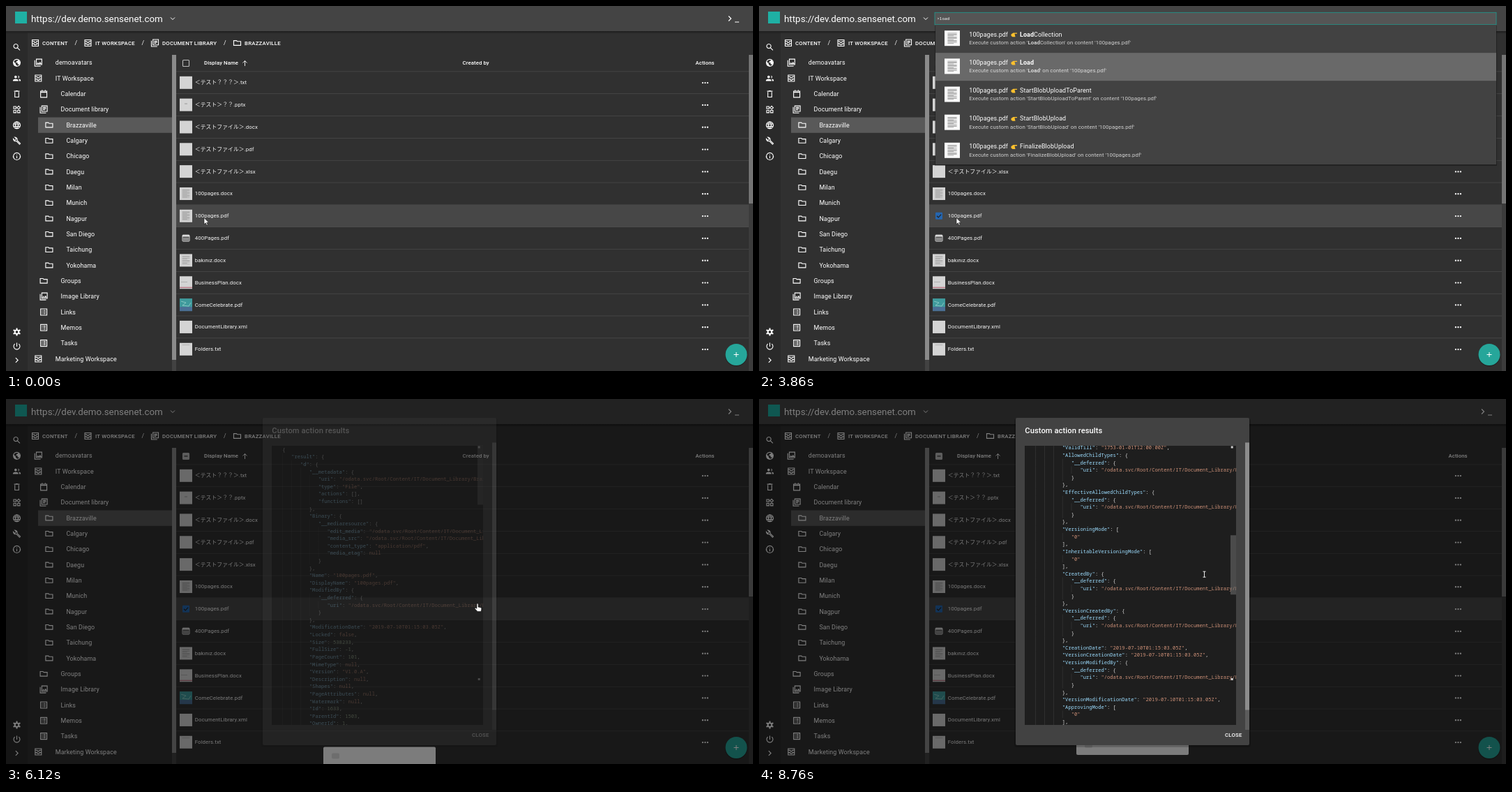
Animation of 1071 by 523 pixels, one loop 9.91 s. Source, as an HTML page:

```html
<!DOCTYPE html>
<html lang="en">
<head>
<meta charset="utf-8">
<title>Custom actions demo</title>
<style>
html, body { margin: 0; width: 100%; height: 100%; overflow: hidden; background: #303030; }
svg { display: block; width: 100%; height: 100%; }
text { font-family: Roboto, "Noto Sans CJK JP", "Noto Sans", sans-serif; fill: #fff; white-space: pre; }
.mono { font-family: "Noto Sans Mono", "DejaVu Sans Mono", monospace; }
.s { fill: none; stroke: #fff; }
</style>
</head>
<body>
<svg id="stage" viewBox="0 0 1071 523"></svg>
<script>
const LOOP = 9910, LINE = 10.61;
const out = [];
const add = s => out.push(s);
const esc = s => s.replace(/&/g, '&amp;').replace(/</g, '&lt;');

const rect = (x, y, w, h, fill, more = '') =>
  add(`<rect x="${x}" y="${y}" width="${w}" height="${h}" fill="${fill}" ${more}/>`);
const path = (d, more) => add(`<path d="${d}" ${more}/>`);
// y is the middle of the capitals
const raw = (x, y, html, size, more = '') =>
  add(`<text x="${x}" y="${(y + size * .355).toFixed(2)}" font-size="${size}" letter-spacing=".01em" ${more}>${html}</text>`);
const text = (x, y, str, size, more) => raw(x, y, esc(str), size, more);
const caps = (x, y, str, more = '') =>
  add(`<text x="${x}" y="${y + 2.8}" font-size="7.81" font-weight="500" letter-spacing=".0286em" ${more}>${str}</text>`);
const open = (id, more = '') => add(`<g id="${id}" ${more}>`);
const close = () => add('</g>');

// [stroked outline, filled part, line width] on a 24 unit grid
const RING = 'M12 3a9 9 0 1 0 .01 0';
const ICONS = {
  search: ['M9.5 4a5.5 5.5 0 1 0 .01 0M14 14l6 6'],
  earth: [RING, 'M4 9l5 5v2l3 3v2q-9 0-8-12M15 4v2q-1 2-4 2v3H8v1h6v4h3l2 2q4-9-4-14'],
  people: ['', 'M9 11.5a3.3 3.3 0 1 0-.01 0M2 19v-2c0-4 14-4 14 0v2zM15 11.5a3.3 3.3 0 1 0 0-6.6 5 5 0 0 1 0 6.6M17 13.5c3 .5 5 2 5 3.500v2h-4v-2q0-2-1-3.500'],
  trash: ['M7 7v13h10V7M5 5h14M9.500 4h5'],
  widgets: ['M4 4h6v6H4zM4 14h6v6H4zM14 14h6v6h-6zM16.700 3l4.200 4.200-4.200 4.200-4.200-4.200z'],
  globe: [RING + 'M12 3c-5 5-5 13 0 18c5-5 5-13 0-18M3.500 9h17M3.500 15h17'],
  wrench: ['M13 11l8 8-2 2-8-8c-4 1-8-1-8-6l4 4 4-4-4-4c5 0 7 4 6 8z'],
  info: [RING + 'M12 11v6M12 7v2'],
  gear: ['M12 7a5 5 0 1 0 .01 0M12 2v4M12 18v4M3.300 7l3.500 2M17.200 15l3.500 2M3.300 17l3.500-2M17.200 9l3.500-2', '', 3.6],
  power: ['M12 3v10M17 6a8 8 0 1 1-10 0'],
  next: ['M9 6l6 6-6 6'],
  down: ['M6 9l6 6 6-6'],
  up: ['M12 21V4M5 11l7-7 7 7'],
  images: ['M7 3h14v14H7zM3 6v15h15', 'M8 15l3-4 2.500 3 3-4 4 5z'],
  inbox: ['M4 4h16v16H4zM4 8h5c0 4 6 4 6 0h5M4 14h5c0 4 6 4 6 0h5'],
  calendar: ['M4 5h16v16H4zM4 8h16M8 2v4M16 2v4'],
  books: ['M7 3h14v14H7zM3 6v15h15M10 7h8M10 10h8M10 13h5'],
  folder: ['M3 6v12h18V8h-9l-2-2z'],
  list: ['M4 4h16v16H4zM7 8h2M11 8h6M7 12h2M11 12h6M7 16h2M11 16h6'],
};
function icon(name, x, y, size = 13.4) {
  const [line, fill = '', width = 2] = ICONS[name], k = size / 24;
  add(`<g transform="translate(${x - size / 2} ${y - size / 2}) scale(${k})">
    <path class="s" d="${line}" stroke-width="${width}"/><path d="${fill}" fill="#fff"/></g>`);
}

function page(x, y, size, color, lines) {
  rect(x, y, size, size, color);
  for (let i = 0; i < lines; i++)
    rect(x + size * .2, y + size * (.15 + .72 * i / lines), size * (i % 4 == 3 ? .4 : .6), size * .035, '#999');
}

function topBar() {
  rect(0, 36, 1071, 4, 'url(#shade)');
  rect(0, 0, 1071, 36, '#444');
  rect(13, 8, 17, 17, '#1fb0a4');
  text(36, 18, 'https://dev.demo.sensenet.com', 13.39, 'style="letter-spacing:0"');
  icon('down', 239, 18, 12);
  open('prompt');
  path('M-2 -3.500l3.500 3.500-3.500 3.500M7 5h6', 'class="s" stroke-width="1.2"');
  close();
  [['inbox', 42, 'CONTENT', 52], ['inbox', 117.5, 'IT WORKSPACE', 128],
   ['books', 213.5, 'DOCUMENT LIBRARY', 224], ['folder', 331.5, 'BRAZZAVILLE', 342]]
    .forEach(([ic, x, label, tx]) => { icon(ic, x, 53); caps(tx, 52.7, label); });
  [98.5, 194.5, 312].forEach(x => text(x, 52.5, '/', 8.92));
}

function sidebar() {
  rect(0, 38, 31, 485, '#2a2a2a');
  'search earth people trash widgets globe wrench info'.split(' ')
    .forEach((n, i) => icon(n, 15.5, 59 + i * 22.35));
  icon('gear', 15.5, 467);
  icon('power', 15.5, 487.5);
  icon('next', 15.5, 507.5);
  rect(46, 159.5, 192, 22.3, '#595959');
  const rows = ['images0demoavatars', 'inbox0IT Workspace', 'calendar1Calendar', 'books1Document library',
    ...'Brazzaville,Calgary,Chicago,Daegu,Milan,Munich,Nagpur,San Diego,Taichung,Yokohama'.split(',').map(c => 'folder2' + c),
    'folder1Groups', 'images1Image Library', 'list1Links', 'list1Memos', 'list1Tasks', 'inbox0Marketing Workspace'];
  rows.forEach((row, i) => {
    const [, ic, level, label] = row.match(/^([a-z]+)(\d)(.+)/), y = 81.2 + i * 22.33;
    icon(ic, 46.3 + level * 7.8, y);
    text(70.8 + level * 7.8, y, label, 8.92);
  });
  rect(238, 70, 6, 453, '#424242');
  rect(238, 70, 6, 437, '#8a8a8a');
}

function table() {
  const names = ['＜テスト？？？＞.txt', '＜テスト＞？？.pptx', '＜テストファイル＞.docx', '＜テストファイル＞.pdf',
    '＜テストファイル＞.xlsx', '100pages.docx', '100pages.pdf', '400Pages.pdf', 'bakınız.docx', 'BusinessPlan.docx',
    'ComeCelebrate.pdf', 'DocumentLibrary.xml', 'Folders.txt'];
  const head = 'font-weight="500"';
  rect(253.5, 77.5, 9, 9, 'none', 'id="box" rx="1" stroke="#bbb" stroke-width="1.1"');
  rect(255.5, 81.3, 5, 1.2, '#303030', 'id="dash"');
  text(284, 81.7, 'Display Name', 7.81, head);
  icon('up', 342.5, 82, 10.5);
  text(654.5, 81.7, 'Created by', 7.81, head);
  text(988.5, 81.7, 'Actions', 7.81, head);
  names.forEach((name, i) => {
    const y = 109.8 + i * 31.83;
    if (i == 6) rect(244, y - 15.7, 821, 31.8, '#474747');
    rect(244, y - 16.2, 821, .6, '#515151');
    if (i == 6) open('thumb');
    if (i == 7) {
      rect(253, y - 4.500, 10, 9, 'none', 'rx="1" stroke="#ddd"');
      rect(253, y - 4.500, 10, 2.500, '#ddd');
      rect(254, y - 1, 8, 5, '#8a8a8a');
    } else if (i == 10) {
      rect(249, y - 9, 18, 18, '#3f9a9c');
      rect(249, y + 3, 18, 6, '#4b6f95');
      path(`M251 ${y - 5}l7 2-5 4 9 1 3-5`, 'fill="none" stroke="#a5d8d2" stroke-width=".7"');
    } else {
      page(249, y - 9, 18, '#d4d4d4', [0, 0, 0, 0, 0, 13, 13, 0, 9, 0, 0, 0, 1][i]);
      if (i == 1) rect(256, y - 2, 4, .8, '#888');
      if (i == 9) { rect(251, y - 1, 9, .6, '#999'); rect(249, y + 6.500, 18, 1, '#b0566a'); }
    }
    if (i == 6) {
      close();
      open('tick');
      rect(253, y - 5, 10, 10, '#2566b0', 'rx="1"');
      path(`M255 ${y}l2.200 2.200 4-4.300`, 'fill="none" stroke="#222" stroke-width="1.2"');
      close();
    }
    text(270.8, y - .3, name, 7.81, 'fill-opacity=".95"');
    [998.9, 1002.4, 1005.9].forEach(x => add(`<circle cx="${x}" cy="${y + .3}" r="1.15" fill="#fff"/>`));
  });
  rect(1065, 70, 6, 453, '#3c3c3c');
  rect(1065, 70, 6, 213, '#747474');
  add('<circle cx="1047" cy="500.5" r="16" fill="#000" opacity=".25"/><circle cx="1047" cy="499.500" r="15.500" fill="#26a69a"/>');
  path('M1043.500 499.500h7M1047 496v7', 'class="s" stroke-width="1"');
}

function palette() {
  open('palette');
  rect(252, 9.3, 805, 17.4, '#555', 'id="field" stroke="#1f9c91" stroke-width=".8"');
  text(255.2, 18, '', 6, 'id="typed" class="mono" style="letter-spacing:0"');
  rect(273, 14, .7, 8, '#fff', 'id="caret"');
  open('results');
  rect(252, 28, 806, 201, '#000', 'opacity=".3"');
  rect(253, 27, 804, 200, '#424242');
  ['LoadCollection', 'Load', 'StartBlobUploadToParent', 'StartBlobUpload', 'FinalizeBlobUpload'].forEach((name, i) => {
    const y = 27 + i * 40.15;
    const rich = name.replace(/^Load/, '<tspan font-weight="700">Load</tspan>');
    if (i < 2) rect(253, y, 804, 40, '#696969', `id="pick${i}"`);
    page(266, y + 8.2, 22, '#fafafa', 12);
    text(301.3, y + 13.7, '100pages.pdf', 8.92);
    path(`M361.500 ${y + 13.500}l3-2h5.500v1.300h-3.500l1 4.500h-4l-2-1.500z`, 'fill="#fbc02d"');
    raw(374, y + 13.7, rich, 8.92);
    raw(301.3, y + 25.3, `Execute custom action '${rich}' on content '100pages.pdf'`, 7.81, 'fill-opacity=".75"');
  });
  close();
  close();
}

function confirmBox() {
  open('confirm');
  rect(366, 219, 339, 90, '#000', 'opacity=".2" rx="4"');
  rect(368, 218.5, 335, 87, '#424242', 'rx="2"');
  text(381.3, 236.3, "Execute custom action 'Load' on content '100pages.pdf'", 11.15, 'font-weight="500" style="letter-spacing:.0075em"');
  text(381.3, 265, 'The action does not have any parameters', 8.92);
  rect(655, 281, 43, 20, '#555', 'id="hover" rx="2"');
  add('<circle id="ripple" cx="676.500" cy="291" r="14" fill="#6e6e6e" clip-path="url(#button)"/>');
  caps(614.5, 290.5, 'CANCEL');
  caps(658.8, 290.5, 'EXECUTE');
  close();
}

const ROOT = '/Root/Content/IT/Document_Library/Brazzaville';
const uri = `/odata.svc${ROOT}('100pages.pdf')`;
const ref = name => ({ [name]: { __deferred: { uri: `${uri}/${name}` } } });
const date = '2019-07-10T01:15:03.05Z';
const answer = { result: { d: {
  __metadata: { uri, type: 'File', actions: [], functions: [] },
  Binary: { __mediaresource: { edit_media: uri, media_src: uri, content_type: 'application/pdf', media_etag: null } },
  Name: '100pages.pdf', DisplayName: '100pages.pdf', ...ref('ModifiedBy'), ModificationDate: date,
  Locked: false, Size: 538233, FullSize: -1, PageCount: 101, MimeType: null, Version: 'V1.0.A',
  Description: null, Shapes: null, PageAttributes: null, Watermark: null, Id: 1633, ParentId: 1503,
  OwnerId: 1, ...ref('Owner'), VersionId: 646, Type: 'File', TypeIs: null, Icon: 'acrobat',
  CreatedById: 1, ModifiedById: 1, Path: ROOT + '/100pages.pdf', Depth: 5, IsSystemContent: false,
  IsFolder: false, Index: 0, Hidden: false, EnableLifespan: false,
  ValidFrom: '1753-01-01T12:00:00Z', ValidTill: '1753-01-01T12:00:00Z',
  ...ref('AllowedChildTypes'), ...ref('EffectiveAllowedChildTypes'), VersioningMode: ['0'],
  InheritableVersioningMode: ['0'], ...ref('CreatedBy'), ...ref('VersionCreatedBy'),
  CreationDate: date, VersionCreationDate: date, ...ref('VersionModifiedBy'),
  VersionModificationDate: date, ApprovingMode: ['0'], InheritableApprovingMode: ['0'], Publishable: false,
} } };

function codeLine(line, i) {
  const y = 72.3 + i * LINE, indent = line.search(/\S/);
  for (let k = 0; k < indent / 3; k++) rect(396.3 + k * 12.85, y - 5.4, .5, LINE + .1, '#404040');
  const html = line.trim().replace(/("[^"]*")(:?)|-?\d+|null|true|false/g, (word, str, colon) => {
    const color = colon ? '#9cdcfe' : str || /[a-z]/.test(word) ? '#ce9178' : '#b5cea8';
    return `<tspan fill="${color}">${str || word}</tspan>${colon || ''}`;
  });
  raw(396.3 + indent * 4.284, y, html, 7.14, 'class="mono" style="letter-spacing:0;fill:#dcdcdc"');
}

function resultBox() {
  open('result');
  rect(366, 28, 339, 471, '#000', 'opacity=".2" rx="4"');
  rect(368, 27, 335, 469, '#424242', 'rx="2"');
  text(381.3, 44.7, 'Custom action results', 11.15, 'font-weight="500" style="letter-spacing:.0075em"');
  rect(381, 67, 303, 400, '#1e1e1e');
  add('<g clip-path="url(#editor)">');
  open('code');
  JSON.stringify(answer, null, 3).split('\n').forEach(codeLine);
  close();
  close();
  rect(676, 67, 8, 85, '#797979', 'id="bar" opacity=".5"');
  rect(676.7, 67.5, 3, 3, '#ccc');
  rect(676.7, 400, 3, 3, '#ccc');
  rect(697, 62.5, 6, 411.5, '#5c5c5c');
  rect(697, 62.5, 6, 383, '#8c8c8c');
  caps(668, 481.3, 'CLOSE');
  close();
}

add(`<defs>
  <linearGradient id="shade" x2="0" y2="1"><stop stop-opacity=".4"/><stop offset="1" stop-opacity="0"/></linearGradient>
  <clipPath id="button"><rect x="655" y="281" width="43" height="20" rx="2"/></clipPath>
  <clipPath id="editor"><rect x="381" y="67" width="303" height="400"/></clipPath></defs>`);
rect(0, 0, 1071, 523, '#303030');
sidebar();
table();
topBar();
palette();
open('snack');
rect(455, 483, 161, 27, '#fafafa', 'rx="2"');
rect(467, 492, 11, 8, '#ddd', 'rx="2"');
close();
rect(0, 0, 1071, 523, '#000', 'id="dim"');
confirmBox();
resultBox();
add('<circle id="click" cx="677" cy="296" r="6.2" fill="#f2e21c" opacity=".85"/>');
open('arrow');
path('M0 0v9.300l2.200-2 1.600 3.500 1.500-.7-1.600-3.300h3z', 'fill="#fff" stroke="#111" stroke-width=".6"');
close();
open('hand');
path('M-1 1c0-1.300 2-1.300 2 0v4l4 1q1 .500 .8 2l-.8 3.500h-5l-3.700-4q-.6-1.500 1-1.200l1.700 1z', 'fill="#fff" stroke="#111" stroke-width=".6"');
close();
open('beam');
path('M-2 -4h4M0 -4v8M-2 4h4', 'class="s" stroke-width=".9"');
close();
stage.innerHTML = out.join('');

const el = {};
document.querySelectorAll('[id]').forEach(e => el[e.id] = e);
const set = (id, attrs) => { for (const k in attrs) el[id].setAttribute(k, attrs[k]); };
const show = (id, on) => el[id].style.display = on ? '' : 'none';
const move = (id, x, y) => set(id, { transform: `translate(${x} ${y})` });
const ramp = (t, a, b) => Math.min(1, Math.max(0, (t - a) / (b - a)));
const smooth = p => p * p * (3 - 2 * p);
const easeOut = (p, n) => 1 - (1 - p) ** n;
const mix = (a, b, p) => a + (b - a) * p;
const passed = (t, times) => times.filter(x => t >= x).length;

function pointer(t) {
  const over = smooth(ramp(t, 4600, 5560)), leave = smooth(ramp(t, 6540, 6990));
  let x = mix(mix(284, 283, ramp(t, 320, 410)), 676, over);
  let y = mix(303.5, 293, over) - 38 * Math.sin(Math.PI * over);
  x = mix(x, 645.3, leave);
  y = mix(y, 240, leave);
  if (t >= 8050) [x, y] = [638.5, 251.2];
  const kind = leave > .6 ? 'beam' : over > .97 && t < 6200 ? 'hand' : 'arrow';
  ['arrow', 'hand', 'beam'].forEach(id => show(id, id == kind));
  move(kind, x, y);
}

function draw(t) {
  const picked = t >= 560;
  show('thumb', !picked);
  show('tick', picked);
  show('dash', picked);
  set('box', { fill: picked ? '#bbb' : 'none' });

  const left = mix(1057, 252, smooth(ramp(t, 740, 1200)));
  set('field', { x: left, width: 1057 - left });
  show('palette', t >= 810 && t < 4180);
  const count = passed(t, [1750, 2280, 2600, 2680, 2760]);
  el.typed.textContent = '>load'.slice(0, count);
  set('caret', { x: 255.2 + count * 3.6 });
  show('caret', t >= 1750 && t < 3390);
  show('results', t >= 2760);
  const next = ramp(t, 3660, 3860);
  set('pick0', { opacity: 1 - next });
  set('pick1', { opacity: next });

  show('prompt', t < 810 || t >= 4180);
  move('prompt', t < 810 ? 1038 : mix(233, 1038, easeOut(ramp(t, 4140, 4490), 5)), 18);

  const dialog = t < 4180 ? 0 : easeOut(ramp(t, 4160, 4390), 2);
  set('dim', { opacity: dialog * .5 });
  set('confirm', { opacity: dialog * (1 - ramp(t, 5950, 6110)) });
  set('result', { opacity: smooth(ramp(t, 6030, 6300)) });
  set('ripple', { r: 14 + .8 * Math.sin((t - 4260) / 400) });
  show('hover', t >= 5560);
  show('click', t >= 5730 && t < 5960);
  show('snack', t >= 6030);
  move('snack', 0, 42 * (1 - easeOut(ramp(t, 6030, 6350), 3)));

  const scroll = 69.8 * passed(t, [7270, 7440])
    + 58.45 * passed(t, [7515, 7590, 7820, 7900, 8280, 8355, 8430, 8760]);
  move('code', 0, -scroll);
  set('bar', { y: 66.500 + scroll * .212 });
  pointer(t);
}

function tick() {
  draw(performance.now() % LOOP);
  requestAnimationFrame(tick);
}
tick();
</script>
</body>
</html>
```
